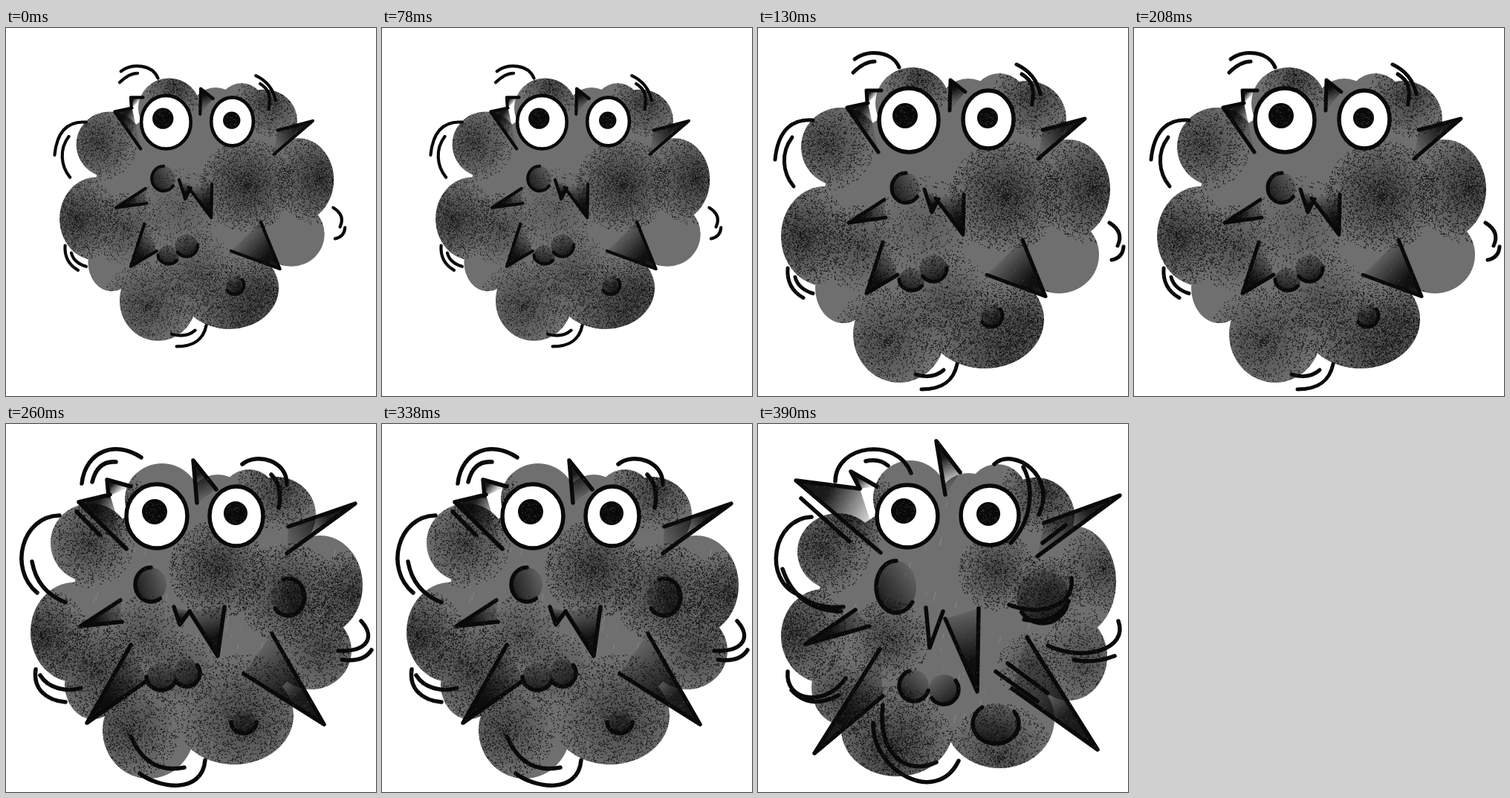
These frames come from a looping animation (498x495 px, 0.52 s). An HTML page with a canvas:

```html
<!DOCTYPE html>
<html lang="en">
<head>
<meta charset="utf-8">
<title>Worried dust cloud</title>
<style>
  html, body { margin: 0; width: 100%; height: 100%; overflow: hidden; background: #fff; }
  canvas { display: block; }
</style>
</head>
<body>
<canvas id="stage" width="498" height="495"></canvas>
<script>
const W = 498, H = 495, HOLD = 130, INK = '#090909', GREY = '#6f6f6f';
const TAU = Math.PI * 2;

// Ellipses: x, y, rx, ry
const roundBody = [
  [208, 101, 50, 48], [283, 108, 40, 40], [325, 100, 38, 39], [362, 122, 53, 51],
  [417, 217, 57, 67], [405, 305, 54, 52], [305, 392, 80, 66], [190, 412, 62, 65],
  [115, 350, 38, 47], [90, 280, 59, 67], [112, 160, 54, 53], [250, 250, 165, 150]
];
const wideBody = [
  [205, 100, 50, 51], [283, 108, 42, 42], [322, 95, 40, 41], [374, 124, 52, 52],
  [424, 212, 58, 75], [418, 313, 52, 59], [325, 397, 74, 66], [187, 411, 75, 63],
  [112, 354, 40, 50], [88, 285, 57, 63], [108, 172, 55, 52], [250, 250, 170, 150]
];

// shades: x, y, r, strength   spikes: side, tip, side   spots: x, y, rx, ry, arc from, to (turns)
const calm = {
  body: roundBody, scratches: 0, pen: 5,
  shades: [
    [92, 155, 58, .75], [333, 225, 68, 1], [452, 215, 68, 1], [370, 92, 50, .8], [58, 280, 62, .95],
    [135, 295, 52, .55], [218, 68, 44, .8], [172, 420, 66, .65], [330, 430, 80, .9],
    [250, 370, 62, .5], [225, 265, 60, .3], [365, 395, 45, .6]
  ],
  spikes: [
    [148, 101, 120, 107, 162, 167], [147, 101, 146, 84, 166, 84], [258, 111, 259, 70, 279, 86],
    [383, 137, 440, 122, 377, 176], [170, 231, 122, 262, 172, 255], [224, 217, 234, 248, 243, 230],
    [239, 229, 276, 278, 277, 224], [168, 288, 146, 357, 188, 332], [356, 285, 387, 361, 308, 332]
  ],
  spots: [[199, 215, 19, 20, .1, .75], [207, 338, 17, 15, .1, .5], [236, 323, 18, 18, 0, .4],
    [314, 387, 15, 15, -.1, .4]],
  lines: `M130 42C148 28 181 31 190 53M128 60Q143 45 157 45M348 49Q374 61 380 89
    M355 62C370 71 372 82 369 103M23 177C27 136 47 122 74 124M46 147C30 168 33 195 48 213
    M473 262Q493 274 484 293M492 294Q491 309 476 312M40 323Q38 350 61 363M50 335Q54 351 74 357
    M268 452C263 476 247 486 220 486M250 460Q235 473 212 466`,
  eyes: [[203, 124, 40, 43, 198, 118, 17], [310, 123, 34, 39, 309, 121, 14]]
};

const alarmed = {
  body: roundBody.map(([x, y, rx, ry]) => [x + (x > 400 ? 6 : 2), y, rx, ry]), scratches: 330, pen: 5.5,
  shades: [
    [112, 160, 54, .7], [285, 195, 60, .95], [368, 85, 52, .85], [380, 228, 62, .9], [470, 230, 55, 1],
    [48, 285, 58, 1], [120, 330, 58, .8], [185, 285, 50, .5], [165, 410, 62, .75],
    [320, 395, 78, .75], [425, 300, 56, .7], [145, 105, 42, .8], [235, 330, 45, .5]
  ],
  spikes: [
    [140, 95, 98, 105, 162, 168], [138, 97, 136, 75, 168, 84], [257, 106, 252, 49, 283, 88],
    [380, 138, 470, 107, 378, 174], [154, 237, 100, 272, 156, 266], [226, 246, 234, 270, 247, 252],
    [247, 252, 285, 312, 294, 246], [168, 297, 109, 402, 190, 345], [358, 282, 428, 404, 320, 336]
  ],
  spots: [[195, 216, 21, 23, .15, .75], [380, 233, 22, 25, -.3, .4], [209, 340, 20, 18, .05, .5],
    [243, 335, 18, 18, -.1, .4], [320, 401, 17, 15, 0, .5]],
  lines: `M102 80C107 37 146 21 182 45M116 78Q123 49 148 51M318 54C338 38 379 49 378 82
    M357 68Q373 85 367 113M72 123C21 124 3 195 42 227M35 185Q42 225 80 240M95 118L127 150
    M478 265C498 287 486 307 447 305M492 304Q481 321 452 317M40 330C36 357 55 372 80 374
    M46 338C57 356 82 361 101 355M168 420Q190 472 240 462M180 470C205 490 264 499 268 452`,
  eyes: [[203, 124, 41, 43, 200, 118, 17], [310, 124, 36, 40, 309, 120, 16]]
};

const spiky = {
  body: wideBody, scratches: 260, pen: 5.5,
  shades: [
    [85, 165, 60, .85], [322, 198, 48, .85], [385, 90, 52, .9], [465, 195, 54, .7], [48, 280, 64, 1],
    [175, 290, 50, .75], [180, 435, 76, 1], [325, 447, 65, .7], [390, 225, 42, .85],
    [440, 315, 56, .6], [130, 110, 52, .8], [110, 365, 50, .7], [365, 325, 40, .5]
  ],
  spikes: [
    [137, 87, 51, 76, 165, 173], [137, 87, 125, 64, 160, 84], [252, 95, 240, 23, 272, 65],
    [385, 133, 487, 96, 376, 178], [131, 250, 64, 296, 150, 272], [252, 262, 295, 360, 297, 248],
    [164, 303, 76, 443, 168, 366], [362, 287, 457, 438, 342, 356]
  ],
  spots: [[186, 219, 27, 35, .1, .75], [383, 232, 35, 36, .03, .4], [210, 352, 20, 21, .05, .7],
    [250, 357, 20, 20, -.1, .4], [320, 403, 31, 27, -.1, .65]],
  lines: `M104 77C105 27 187 17 206 66M145 50Q163 46 175 56M318 54C344 30 403 70 378 122
    M357 58C372 85 369 130 340 160M72 125C20 127 5 210 55 230Q78 249 115 246M33 195Q52 251 112 252
    M58 100L123 158M383 160L414 136M226 247L231 301L249 252M320 333L376 373M336 322L390 362
    M485 265C499 303 438 321 390 298M480 312Q450 323 425 317M422 207C427 245 379 260 338 243
    M418 238Q401 271 358 263M40 333C36 374 92 381 118 342M45 358Q70 385 108 365
    M168 378C160 440 197 475 240 455M155 402C153 466 240 515 270 453`,
  eyes: [[201, 124, 41, 42, 196, 117, 17], [312, 123, 39, 40, 310, 121, 16]]
};

function seeded(seed) {
  return () => {
    seed = (seed + 0x6D2B79F5) | 0;
    let t = Math.imul(seed ^ seed >>> 15, 1 | seed);
    t ^= t + Math.imul(t ^ t >>> 7, 61 | t);
    return ((t ^ t >>> 14) >>> 0) / 4294967296;
  };
}

function render(pose, scale = 1, dx = 0, dy = 0) {
  const canvas = document.createElement('canvas');
  canvas.width = W;
  canvas.height = H;
  const g = canvas.getContext('2d'), random = seeded(7);
  g.setTransform(scale, 0, 0, scale, dx, dy);
  g.lineCap = g.lineJoin = 'round';

  const ellipse = (x, y, rx, ry, from = 0, to = 1) => {
    g.beginPath();
    g.ellipse(x, y, rx, ry, 0, from * TAU, to * TAU);
  };
  const fade = (gradient, from, to) => {
    gradient.addColorStop(0, `rgba(8,8,8,${from})`);
    gradient.addColorStop(1, `rgba(8,8,8,${to})`);
    return gradient;
  };
  const dot = (x, y, size, color) => {
    g.fillStyle = color;
    g.fillRect(x, y, size, size);
  };

  g.fillStyle = GREY;
  for (const lobe of pose.body) { ellipse(...lobe); g.fill(); }

  g.globalCompositeOperation = 'source-atop';
  for (const [x, y, r, strength] of pose.shades) {
    g.fillStyle = fade(g.createRadialGradient(x, y, 0, x, y, r), strength * .55, 0);
    ellipse(x, y, r, r);
    g.fill();
    for (let i = r * r * strength * .75; i > 0; i--) {
      const angle = random() * TAU, d = r * 1.1 * random() ** .65;
      dot(x + d * Math.cos(angle), y + d * Math.sin(angle), 1.2, random() < .75 ? INK : '#656565');
    }
  }
  for (let i = 0; i < pose.scratches; i++) {
    const x = random() * W, y = random() * H, length = 2 + random() * 9;
    g.strokeStyle = `rgba(205,205,205,${.1 + random() * .3})`;
    g.lineWidth = .8;
    g.beginPath();
    g.moveTo(x, y);
    g.lineTo(x + length * .25, y - length);
    g.stroke();
  }

  g.globalCompositeOperation = 'source-over';
  g.strokeStyle = INK;
  g.lineWidth = pose.pen;
  for (const [x, y, rx, ry, from, to] of pose.spots) {
    const mid = (from + to) / 2 * TAU, c = Math.cos(mid) * rx, s = Math.sin(mid) * ry;
    g.fillStyle = fade(g.createLinearGradient(x + c, y + s, x - c, y - s), .8, .15);
    ellipse(x, y, rx, ry);
    g.fill();
    ellipse(x, y, rx, ry, from, to);
    g.stroke();
  }
  for (const [ax, ay, tx, ty, bx, by] of pose.spikes) {
    g.beginPath();
    g.moveTo(ax, ay);
    g.lineTo(tx, ty);
    g.lineTo(bx, by);
    const gradient = g.createLinearGradient(tx, ty, (ax + bx) / 2, (ay + by) / 2);
    gradient.addColorStop(.4, 'rgba(8,8,8,.92)');
    g.fillStyle = fade(gradient, .95, .15);
    g.fill();
    g.stroke();
  }
  g.stroke(new Path2D(pose.lines));

  // Chalky grain over everything inked
  g.globalCompositeOperation = 'source-atop';
  for (let i = 0; i < 6500; i++) {
    dot(random() * W, random() * H, 1, `rgba(120,120,120,${random() * .6})`);
  }

  g.globalCompositeOperation = 'source-over';
  for (const [x, y, rx, ry, px, py, pr] of pose.eyes) {
    ellipse(x, y, rx, ry);
    g.fillStyle = '#fff';
    g.fill();
    g.lineWidth = 5.5;
    g.stroke();
    ellipse(px, py, pr, pr);
    g.fillStyle = INK;
    g.fill();
    for (let i = 0; i < 45; i++) {
      const angle = random() * TAU, d = pr * .85 * Math.sqrt(random());
      dot(px + d * Math.cos(angle), py + d * Math.sin(angle), 1, '#444');
    }
  }
  return canvas;
}

const SMALL = 1 / 1.2;
const poses = [render(calm, SMALL, 55.5 * SMALL, 28 * SMALL), render(calm), render(alarmed), render(spiky)];
const stage = document.getElementById('stage').getContext('2d');
const start = performance.now();

function draw() {
  const step = Math.floor((performance.now() - start) / HOLD) % poses.length;
  stage.fillStyle = '#fff';
  stage.fillRect(0, 0, W, H);
  stage.drawImage(poses[step], 0, 0);
  requestAnimationFrame(draw);
}
draw();
</script>
</body>
</html>
```
